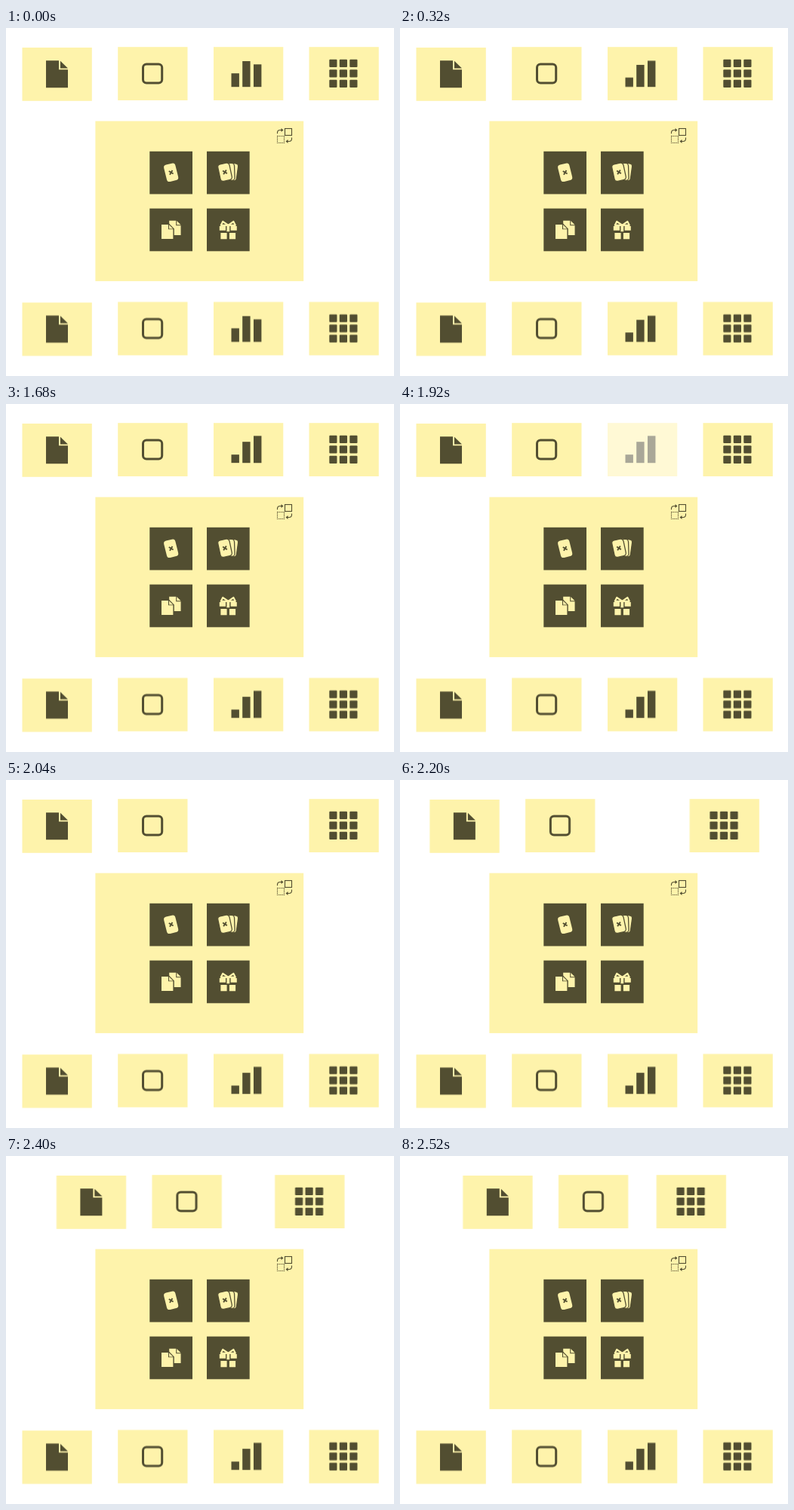
Recreate the animation shown at these times as an HTML page. Size 514x462 px, loop 2.6 s.

```html
<!DOCTYPE html>
<html lang="en">
<head>
<meta charset="utf-8">
<title>Card layout</title>
<style>
  html, body { margin: 0; width: 100%; height: 100%; overflow: hidden; background: #fff; }
  svg { display: block; width: 514px; height: 462px; }

  .paper { fill: #fef3ab; }
  .ink { fill: #524e31; }
  .line { fill: none; stroke: #524e31; }

  .bar, .right, .left, .gone {
    animation: 2600ms linear -1ms infinite;
  }
  .bar { transform-box: fill-box; transform-origin: 50% 100%; animation-name: grow; }
  .right { --dir: 1; animation-name: slide; }
  .left { --dir: -1; animation-name: slide; }
  .gone { animation-name: fade; }

  /* 0 to 400 ms */
  @keyframes grow {
    0% { transform: scaleY(1); animation-timing-function: steps(10); }
    15.3846%, 100% { transform: scaleY(var(--k)); }
  }
  /* 1800 to 2040 ms */
  @keyframes fade {
    0%, 69.2308% { opacity: 1; animation-timing-function: steps(6); }
    78.4615%, 100% { opacity: 0; }
  }
  /* 2080 to 2520 ms */
  @keyframes slide {
    0% { transform: translateX(0); animation-timing-function: step-end; }
    80% { transform: translateX(calc(var(--dir) * 1.4px)); animation-timing-function: steps(11); }
    96.9231%, 100% { transform: translateX(calc(var(--dir) * 61.8px)); }
  }
</style>
</head>
<body>
<svg viewBox="0 0 514 462">
  <defs>
    <path id="file" d="M0 0H17V12H29V36H0ZM19 0.5L29 10.3H19Z"/>
    <path id="cross" d="M-2.4 -2.4L2.4 2.4M2.4 -2.4L-2.4 2.4" class="line" stroke-width="1.9"/>
    <rect id="card" x="-7.8" y="-11.5" width="15.6" height="23" rx="3.8"/>
    <rect id="cell" width="10.2" height="10.2" rx="1"/>
    <g id="cells">
      <use href="#cell"/><use href="#cell" x="13.5"/><use href="#cell" x="27"/>
    </g>
  </defs>

  <g id="row">
    <g class="right">
      <rect class="paper" x="21.5" y="26" width="92.3" height="70.8"/>
      <use class="ink" href="#file" x="53" y="43.2"/>
    </g>
    <g class="right">
      <rect class="paper" x="148.2" y="25.2" width="92.3" height="70.8"/>
      <rect class="line" stroke-width="3" x="181.5" y="48" width="25.2" height="25" rx="4.5"/>
    </g>
    <g class="gone">
      <rect class="paper" x="275" y="25.2" width="92.3" height="70.8"/>
      <g class="ink">
        <rect class="bar" style="--k:.611" x="298.5" y="60.2" width="10.4" height="18"/>
        <rect class="bar" style="--k:.819" x="313.2" y="44" width="10.4" height="34.2"/>
        <rect class="bar" style="--k:1.2" x="328" y="48.3" width="10.4" height="29.9"/>
      </g>
    </g>
    <g class="left">
      <rect class="paper" x="401.5" y="25.2" width="92.3" height="70.8"/>
      <g class="ink" transform="translate(428.3 41.8)">
        <use href="#cells"/><use href="#cells" y="13.5"/><use href="#cells" y="27"/>
      </g>
    </g>
  </g>

  <rect class="paper" x="118.4" y="123.6" width="275.8" height="212.5"/>

  <g class="line" stroke-width="1.1">
    <rect x="369.5" y="133.5" width="9" height="9"/>
    <rect x="359.5" y="143.5" width="9" height="9" stroke-dasharray="1.2 1"/>
    <path d="M359.5 140.3V139Q359.5 135.5 363 135.5H366M378.5 145.5V147Q378.5 150.5 375 150.5H372"/>
  </g>
  <path class="ink" d="M364.5 133L367.5 135.5L364.5 138ZM373.5 148L370.5 150.5L373.5 153Z"/>

  <g class="ink">
    <rect x="190.3" y="163.8" width="56.7" height="56.7"/>
    <rect x="266" y="163.8" width="56.7" height="56.7"/>
    <rect x="190.3" y="239.6" width="56.7" height="56.7"/>
    <rect x="266" y="239.6" width="56.7" height="56.7"/>
  </g>

  <g transform="translate(218.7 191.8) rotate(-14)">
    <use class="paper" href="#card"/>
    <use href="#cross"/>
  </g>

  <g class="paper" stroke="#524e31" stroke-width="1.3">
    <use href="#card" transform="translate(298.8 190.8) rotate(8)"/>
    <use href="#card" transform="translate(295 191) rotate(-2)"/>
    <use href="#card" transform="translate(290 191.3) rotate(-12)"/>
  </g>
  <use href="#cross" transform="translate(290 191.3) rotate(-12)"/>

  <g class="paper">
    <use href="#file" transform="translate(216.2 255.8) scale(.53)"/>
    <path class="ink" d="M204.5 259.6H216L222.8 266.4V281.5H204.5Z"/>
    <use href="#file" transform="translate(206 261) scale(.53)"/>
  </g>

  <g class="paper">
    <path d="M282.8 263H291V268.8H282.8ZM297.6 263H305.8V268.8H297.6ZM292.4 262H296.2V270.2H292.4Z"/>
    <path d="M284.4 272H292.6V280.2H284.4ZM295.9 272H304.1V280.2H295.9Z"/>
    <path d="M294.3 261.6L287.2 257L284.8 261.8H294.3L301.4 257L303.8 261.8H294.3"
          fill="none" stroke="#fef3ab" stroke-width="2.2" stroke-linejoin="round"/>
  </g>
</svg>
<script>
  // The lower row keeps the bars' motion but its cards stay in place.
  const row = document.getElementById('row');
  const lower = row.cloneNode(true);
  lower.removeAttribute('id');
  lower.setAttribute('transform', 'translate(0 338.5)');
  for (const card of lower.children) card.removeAttribute('class');
  row.after(lower);
</script>
</body>
</html>
```
